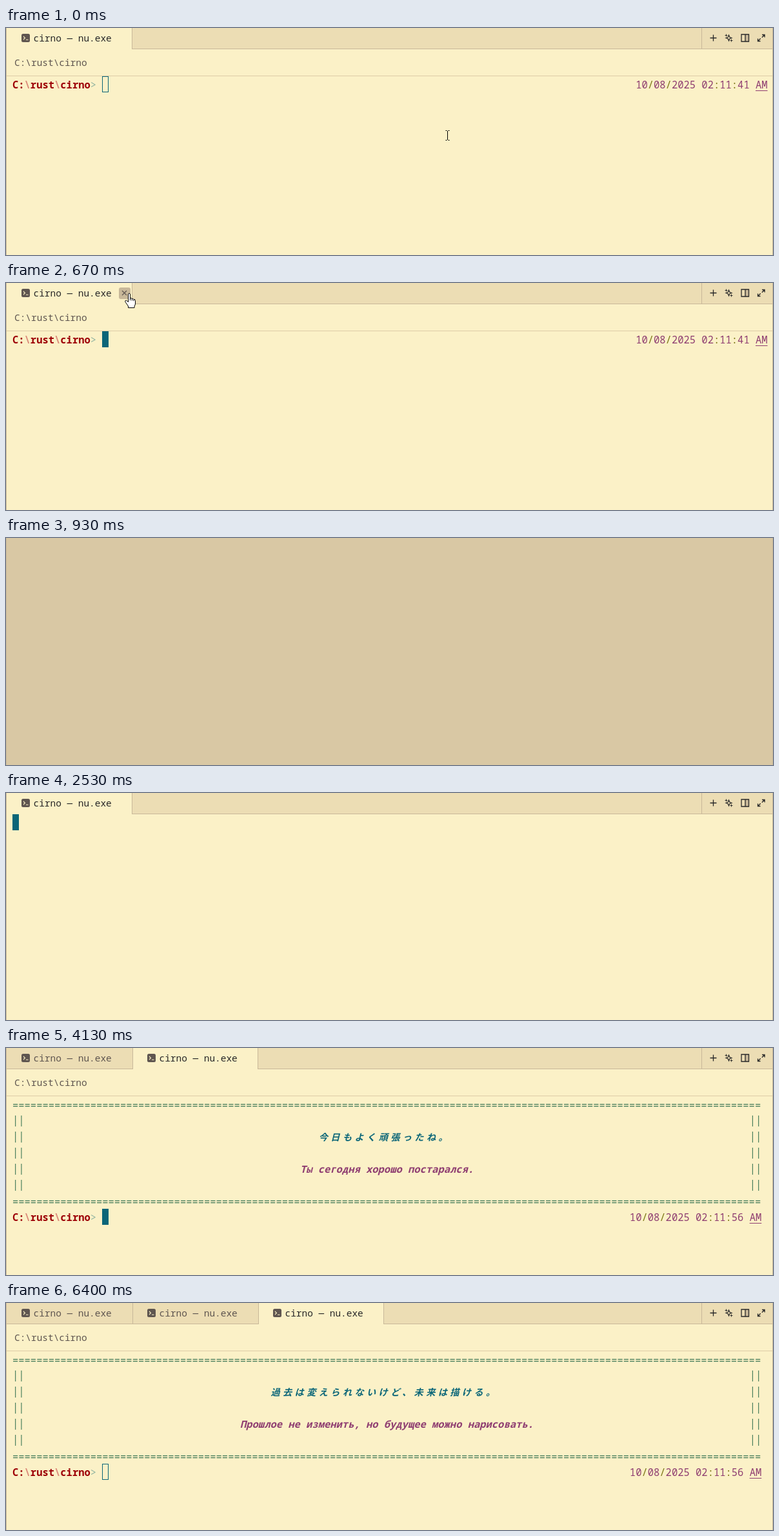
An HTML page with a canvas that plays this animation: 1189x353 px, repeating every 6.87 s.

```html
<!DOCTYPE html>
<html lang="en">
<head>
<meta charset="utf-8">
<title>Terminal tabs</title>
<style>
  html, body { margin: 0; width: 100%; height: 100%; overflow: hidden; background: #d9c8a4; }
  canvas { display: block; }
</style>
</head>
<body>
<canvas id="stage" width="1189" height="353"></canvas>
<script>
const ctx = document.getElementById('stage').getContext('2d');
const LOOP = 6870, STEP = 200 / 3, CELL = 9.29, LINE = 25, LEFT = 10, TAB = 195;
const FAMILY = '"Noto Sans Mono", "Noto Sans CJK JP", monospace';
const C = {
  pane: '#fbf1c7', bar: '#ecddb4', empty: '#d9c8a4', border: '#c8b899', faint: '#ddcca7',
  text: '#282828', muted: '#5f5650', red: '#9d0006', slash: '#db8b7a', arrow: '#8fb3a0',
  blue: '#0b6678', purple: '#8f3e71', olive: '#797410', green: '#437b59'
};
const BANNERS = [
  { ja: '一歩ずつ進めばいい。', ru: 'Достаточно идти шаг за шагом.', sec: 54 },
  { ja: '今日もよく頑張ったね。', ru: 'Ты сегодня хорошо постарался.', sec: 56 },
  { ja: '過去は変えられないけど、未来は描ける。', ru: 'Прошлое не изменить, но будущее можно нарисовать.', sec: 56 }
];

function box(x, y, w, h, color) {
  ctx.fillStyle = color;
  ctx.fillRect(x, y, w, h);
}

function rounded(x, y, w, h, r, color) {
  ctx.fillStyle = color;
  ctx.beginPath();
  ctx.roundRect(x, y, w, h, r);
  ctx.fill();
}

function stroke(d, color, width = 1.3) {
  ctx.strokeStyle = color;
  ctx.lineWidth = width;
  ctx.stroke(new Path2D(d));
}

function label(str, x, y, color) {
  ctx.font = `14.45px ${FAMILY}`;
  ctx.fillStyle = color;
  ctx.fillText(str, x, y);
}

// Text on the terminal grid, with an optional baseline shift.
function put(row, col, str, color, style = '', shift = 0) {
  ctx.font = `${style} ${CELL / 0.6}px ${FAMILY}`;
  ctx.fillStyle = color;
  ctx.fillText(str, LEFT + col * CELL, 94 + row * LINE + shift);
}

// Full-width glyphs take two cells each.
function putWide(row, col, str, color) {
  const size = 14.2;
  ctx.font = `italic bold ${size}px ${FAMILY}`;
  ctx.fillStyle = color;
  ctx.letterSpacing = `${CELL * 2 - size}px`;
  ctx.fillText(str, LEFT + col * CELL + 1, 94 + row * LINE);
  ctx.letterSpacing = '0px';
}

function caret(x, y, filled) {
  if (filled) return box(x, y, 10, LINE, C.blue);
  ctx.strokeStyle = C.blue;
  ctx.lineWidth = 1;
  ctx.strokeRect(x + 0.5, y + 0.5, 9, LINE - 1);
}

function borders() {
  box(0, 0, 1, 353, C.border);
  box(1188, 0, 1, 353, C.border);
}

function toolbar() {
  box(1078, 0, 1, 32, C.border);
  stroke('M1091.5 15.5h10M1096.5 10.5v10', C.text);
  stroke('M1120.5 11L1121.8 14.2L1125 15.5L1121.8 16.8L1120.5 20L1119.2 16.8L1116 15.5L1119.2 14.2Z', C.text, 1.2);
  stroke('M1116.5 9.5v4M1114.5 11.5h4M1124.5 17.5v4M1122.5 19.5h4', C.text, 0.9);
  box(1146, 10, 6, 11, C.border);
  stroke('M1140 10h11.5v11h-11.5zM1146 10v11', C.text);
  stroke('M1172 10.5h4v4M1176 10.5l-4.2 4.2M1169.5 20.5h-4v-4M1165.5 20.5l4.2-4.2', C.text);
}

function tabs(count) {
  const active = count - 1;
  box(0, 0, 1189, 353, C.pane);
  box(0, 0, 1189, 32, C.bar);
  box(0, 32, 1189, 1, C.border);
  const start = active * TAB + 1;
  box(start, 0, TAB, 33, C.pane);
  box(TAB * count, 0, 1, 33, C.border);
  for (let i = 0; i < count; i++) {
    const x = TAB * i;
    if (i) box(x + 1, 0, 1, 33, C.border);
    rounded(x + 24, 9, 13, 13, 2.5, C.muted);
    stroke(`M${x + 27} 13l2.5 2.5l-2.5 2.5M${x + 31} 18.3h3.5`, C.pane, 1.1);
    label('cirno — nu.exe', x + 42.5, 21, i === active ? C.text : C.muted);
  }
  toolbar();
}

function pathBar() {
  label('C:\\rust\\cirno', 13, 59, C.muted);
  box(1, 74, 1187, 1, C.faint);
}

function prompt(row, width, sec, filled) {
  const parts = [['C:', C.red], ['\\', C.slash], ['rust', C.red], ['\\', C.slash], ['cirno', C.red], ['>', C.arrow]];
  let col = 0;
  for (const [str, color] of parts) {
    put(row, col, str, color, color === C.arrow ? '' : 'bold');
    col += str.length;
  }
  caret(149, 75 + row * LINE, filled);
  col = width - 22;
  for (const ch of `10/08/2025 02:11:${sec} AM`)
    put(row, col++, ch, /[/:]/.test(ch) ? C.olive : C.purple);
  box(LEFT + (width - 2) * CELL, 97 + row * LINE, 2 * CELL, 1, C.purple);
}

function banner({ ja, ru, sec }, filled) {
  const width = 125;
  const middle = n => Math.floor((width - n) / 2);
  for (const row of [0, 6]) put(row, 0, '='.repeat(width), C.green, '', 1);
  for (let row = 1; row < 6; row++)
    for (const col of [0, width - 2]) put(row, col, '||', C.green, '', -1);
  putWide(2, middle(ja.length * 2), ja, C.blue);
  put(4, middle(ru.length), ru, C.purple, 'italic bold');
  prompt(7, width, sec, filled);
}

function pointer(kind, x, y) {
  ctx.save();
  ctx.translate(x, y);
  if (kind === 'beam') {
    stroke('M-2.5-7.5h2M1.5-7.5h2M.5-7v14M-2.5 7.5h2M1.5 7.5h2', '#000', 1);
  } else {
    const shape = new Path2D(kind === 'hand'
      ? 'M-1.5 1Q0-1 1.5 1V8Q3 6.5 4.2 8.5Q6 7.5 7 9.5Q9.5 9 9.5 11.5V16Q9.5 18 8 20V22.5H-1.5V20L-6 13.5Q-7 11-4.5 11L-1.5 13.5Z'
      : 'M.5.5V16.5L4.2 13L6.5 18.5L9 17.5L6.7 12H11.5Z');
    ctx.fillStyle = '#fff';
    ctx.fill(shape);
    ctx.strokeStyle = '#000';
    ctx.lineWidth = 1;
    ctx.stroke(shape);
    if (kind === 'hand') stroke('M1.5 7v4M4.3 8.5v3M7 9.5v2.5', '#000', 1);
  }
  ctx.restore();
}

function firstTab(t) {
  const k = Math.min(10, Math.floor((t + 4) / STEP)), p = k / 10;
  const ease = p * p * (3 - 2 * p);
  const x = Math.round(684 - 493 * ease), y = Math.round(167 - 151 * ease);
  const onTab = x < 195 && y < 33;
  tabs(1);
  pathBar();
  prompt(0, 126, 41, k > 0);
  if (onTab) {
    if (x > 174) rounded(175, 7, 18, 18, 3, C.border);
    stroke('M180 12l7 7M187 12l-7 7', C.muted, 1.2);
  }
  borders();
  pointer(onTab ? 'hand' : y > 74 ? 'beam' : 'arrow', x, y);
}

function draw(t) {
  if (t < 730) return firstTab(t);
  if (t < 2530) {
    box(0, 0, 1189, 353, C.empty);
    borders();
    if (t < 870) pointer('arrow', 189, 15);
    else if (t < 930) pointer('arrow', 207, 5);
    return;
  }
  const count = t < 4130 ? 1 : t < 4530 ? 2 : 3;
  tabs(count);
  if (t < 2600) caret(10, 33, true);
  else {
    pathBar();
    banner(BANNERS[count - 1], t < 6400);
  }
  borders();
}

const begin = performance.now();
function tick() {
  draw((performance.now() - begin) % LOOP);
  requestAnimationFrame(tick);
}
tick();
</script>
</body>
</html>
```
